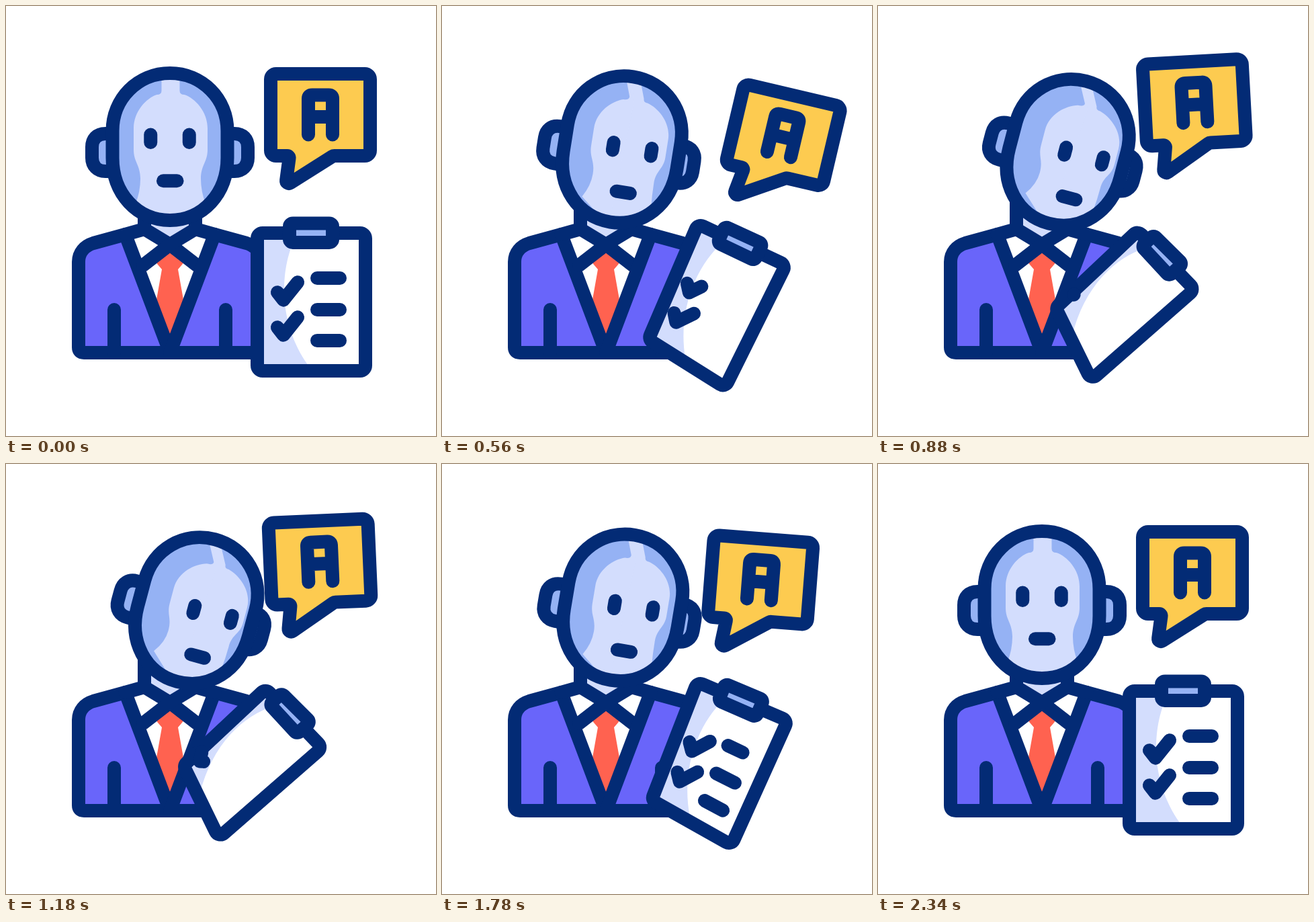
Recreate the animation shown at these times as an HTML page with a canvas. Size 640 by 640 pixels, loop 2.4 s.

```html
<!DOCTYPE html>
<html lang="en">
<head>
<meta charset="utf-8">
<title>Interviewer with checklist</title>
<style>
  html, body { margin: 0; width: 100%; height: 100%; overflow: hidden; background: #fff; }
  canvas { display: block; width: 640px; height: 640px; }
</style>
</head>
<body>
<canvas id="stage" width="640" height="640"></canvas>
<script>
const ctx = document.getElementById('stage').getContext('2d');
const LOOP = 2400;
const AXIS = 244; // the figure is symmetric about this x
const NAVY = '#032b75', PURPLE = '#6965fa', LIGHT = '#d3ddfd', MID = '#95b2f4';
const YELLOW = '#fdcb50', RED = '#ff6250', WHITE = '#fff';

const radians = degrees => degrees * Math.PI / 180;
const clamp = x => Math.min(1, Math.max(0, x));
const ramp = (t, from, to) => clamp((t - from) / (to - from));
const smooth = u => u * u * (3 - 2 * u);
const mix = (a, b, k) => a + (b - a) * k;

function fill(path, color) {
  ctx.fillStyle = color;
  ctx.fill(path);
}

function outline(path, color) {
  if (color) fill(path, color);
  ctx.strokeStyle = NAVY;
  ctx.stroke(path);
}

function transformed(change, draw) {
  ctx.save();
  change();
  draw();
  ctx.restore();
}

const shifted = (dx, dy, draw) => transformed(() => ctx.translate(dx, dy), draw);

function rotatedAbout(x, y, angle, draw) {
  transformed(() => {
    ctx.translate(x, y);
    ctx.rotate(angle);
    ctx.translate(-x, -y);
  }, draw);
}

function bothSides(draw) {
  draw(false);
  transformed(() => { ctx.translate(2 * AXIS, 0); ctx.scale(-1, 1); }, () => draw(true));
}

function polyline(points) {
  const path = new Path2D();
  points.forEach(p => path.lineTo(...p));
  return path;
}

// Points are [x, y] or [x, y, ownRadius].
function roundPolygon(points, radius) {
  const path = new Path2D(), last = points[points.length - 1];
  path.moveTo((last[0] + points[0][0]) / 2, (last[1] + points[0][1]) / 2);
  points.forEach(([x, y, own = radius], i) => {
    const next = points[(i + 1) % points.length];
    path.arcTo(x, y, next[0], next[1], own);
  });
  path.closePath();
  return path;
}

function trimmedLine(points, part) {
  if (part <= 0) return;
  const length = points.slice(1).reduce((sum, [x, y], i) =>
    sum + Math.hypot(x - points[i][0], y - points[i][1]), 0);
  if (part < 1) ctx.setLineDash([length * part, 1000]);
  outline(polyline(points));
  ctx.setLineDash([]);
}

// ---- Body: left halves, mirrored ----
const shirt = new Path2D('M178 340 L206 332 L246 356 V519 H244Z');
const neck = new Path2D('M206 270 H246 V356 H244 L206 332Z');
const tie = new Path2D('M246 360 H244 L224 374 Q222 381 226 385 L232 392 L224 437 L244 496 H246Z');
const jacket = new Path2D('M177.5 340 L130 353 C117 357 108 367 108 381 V508 Q108 516 116 516 H244Z');
const seams = new Path2D('M177.5 340 L206 332 V290 M206 332 L244 355 L284 386 M161 452 V516');

function drawBody() {
  bothSides(() => {
    fill(shirt, WHITE);
    fill(neck, LIGHT);
    fill(tie, RED);
  });
  bothSides(() => {
    outline(jacket, PURPLE);
    outline(seams);
  });
}

// ---- Head ----
const skull = new Path2D('M158.5 186 C158.5 138 196 100 244 100 C292 100 329.5 138 329.5 186 V226 C329.5 279 293 319 244 319 C195 319 158.5 279 158.5 226Z');
const ear = new Path2D('M165 190 H148 C135 190 128 198 128 210 V226 C128 238 136 246 148 246 H165');
const eye = new Path2D('M215.25 191.5 V203');
const mouth = new Path2D('M234 260.3 H254.5');

// One half of the lit face; side is -1 or 1, turn runs from 0 to 1.
function faceHalf(side, turn) {
  const at = (half, y, slide) => [245 + side * half + slide * turn, y];
  const notch = 13.5 - 4.5 * turn;
  const foot = at(notch, 126 + 7 * turn, 15);
  const brow = at(20.5 - 3.5 * turn, 132 + 6 * turn, 13.5);
  const temple = at(55 + 1.5 * turn, 182 + 4 * turn, 15);
  const low = [temple[0], 214 - 5 * turn];
  const cheek = at(45 + 1.5 * turn, 257 - 8 * turn, 13.5);
  const jaw = at(52, 294 - 10 * turn, 6);

  const path = polyline([at(-3, 105, 0), at(notch, 105, 0), foot]);
  path.quadraticCurveTo(foot[0], brow[1], ...brow);
  path.bezierCurveTo(mix(brow[0], temple[0], 0.45), brow[1] + 5, temple[0], temple[1] - 25, ...temple);
  path.lineTo(...low);
  path.bezierCurveTo(low[0], low[1] + 18, cheek[0], cheek[1] - 20, ...cheek);
  path.quadraticCurveTo(cheek[0], mix(cheek[1], jaw[1], 0.5), ...jaw);
  path.lineTo(...at(-3, 330, 0));
  path.lineTo(...at(-3, foot[1] + 8, 15));
  path.closePath();
  return path;
}

function drawHead(turn) {
  const drop = turn * (2 - turn);
  rotatedAbout(231, 361, radians(15) * turn, () => {
    bothSides(far => shifted(far ? 11 * turn : 0, 0, () => outline(ear, MID)));
    fill(skull, MID);
    transformed(() => ctx.clip(skull), () => {
      for (const side of [-1, 1]) fill(faceHalf(side, turn), LIGHT);
    });
    outline(skull);
    shifted(25.5 * turn, 11.5 * drop, () => bothSides(() => outline(eye)));
    shifted(19.7 * turn, 14.3 * drop, () => outline(mouth));
  });
}

// ---- Speech bubble ----
const bubble = roundPolygon([[394, 101], [542, 101], [542, 223], [487, 223, 6], [416, 268, 4], [422, 223, 3], [394, 223]], 8);
const letterA = new Path2D('M450 191.5 V138 Q450 132.5 455.5 132.5 H480.5 Q486 132.5 486 138 V191.5 M450 165 H486');

const still = { x: 0, y: 0, angle: 0 };
const dip = { x: 43, y: 34, angle: 14.5 };
const lift = { x: -7, y: -31, angle: -7.4 };
const nearDip = { ...dip, x: 20 };
const sway = [[0, still], [450, dip], [480, dip], [1040, lift], [1500, nearDip], [1945, still], [LOOP, still]];

function drawBubble(t) {
  const next = sway.findIndex(([time]) => time > t);
  const [[t0, a], [t1, b]] = [sway[next - 1], sway[next]];
  const k = smooth(ramp(t, t0, t1));
  shifted(mix(a.x, b.x, k), mix(a.y, b.y, k), () =>
    rotatedAbout(468, 162, radians(mix(a.angle, b.angle, k)), () => {
      outline(bubble, YELLOW);
      outline(letterA);
    }));
}

// ---- Clipboard ----
// Maps board coordinates (0..1 across and down) to the stage while the board
// swings, shrinks and tapers with the raise q.
function boardMap(q) {
  const across = radians(55 * q), down = radians(48 * q);
  const width = 161 - 42 * q, height = 205 - 19 * q;
  return (u, v) => {
    const a = u - 0.5, b = v - 0.5, taper = 4 * a * b * q;
    return [
      454.5 - 95 * q + a * width * Math.cos(across) - b * height * Math.sin(down) - 8 * taper,
      440.5 + 12 * q * (1 - q) + a * width * Math.sin(across) + b * height * Math.cos(down) + 5 * taper
    ];
  };
}

const rectangle = (at, left, top, right, bottom) =>
  [at(left, top), at(right, top), at(right, bottom), at(left, bottom)];
const dash = v => [[0.553, v], [0.764, v]];
const tick = v => [[0.186, v], [0.242, v + 0.056], [0.373, v - 0.073]];
const marks = [...[0.327, 0.556, 0.78].map(dash), ...[0.43, 0.684].map(tick)];

function markPart(t, i) {
  if (t < 1000) {
    const start = 75 + 145 * i;
    return 1 - ramp(t, start, start + (marks[i].length > 2 ? 230 : 170));
  }
  const start = 1670 - 140 * i;
  return ramp(t, start, start + 145);
}

function drawClipboard(t, q) {
  const at = boardMap(q);
  // Printed details drift towards the near edge as the board turns.
  const drift = (u, v) => at(u - 0.25 * q * q * (0.8 - u), v);
  const corners = rectangle(at, 0, 0, 1, 1);
  const [tl, , br, bl] = corners;

  // Hide the part of the body beyond the board.
  fill(polyline([tl, bl, br, [br[0], 640], [640, 640], [640, tl[1]]]), WHITE);

  const board = roundPolygon(corners, 8);
  fill(board, WHITE);
  const shade = polyline([tl, drift(0.34, 0.05)]);
  shade.bezierCurveTo(...drift(0.2, 0.3), ...drift(0.2, 0.68), ...drift(0.49, 0.98));
  shade.lineTo(...bl);
  transformed(() => ctx.clip(board), () => fill(shade, LIGHT));
  outline(board);

  marks.forEach((points, i) =>
    trimmedLine(points.map(([u, v]) => drift(u, v + 0.11 * q * q)), markPart(t, i)));
  outline(roundPolygon(rectangle(drift, 0.298, -0.071, 0.696, 0.068), 5), MID);
}

function draw(t) {
  ctx.fillStyle = WHITE;
  ctx.fillRect(0, 0, 640, 640);
  ctx.lineWidth = 20;
  ctx.lineCap = ctx.lineJoin = 'round';

  // Head and board go out and come back the same way.
  const turn = smooth(ramp(Math.min(t, 2360 - t), 270, 965) ** 0.65);
  const raise = smooth(ramp(Math.min(t, 2322 - t), 200, 905));

  drawBody();
  drawClipboard(t, raise);
  drawHead(turn);
  drawBubble(t);
}

const start = performance.now();
function frame() {
  draw((performance.now() - start) % LOOP);
  requestAnimationFrame(frame);
}
frame();
</script>
</body>
</html>
```
